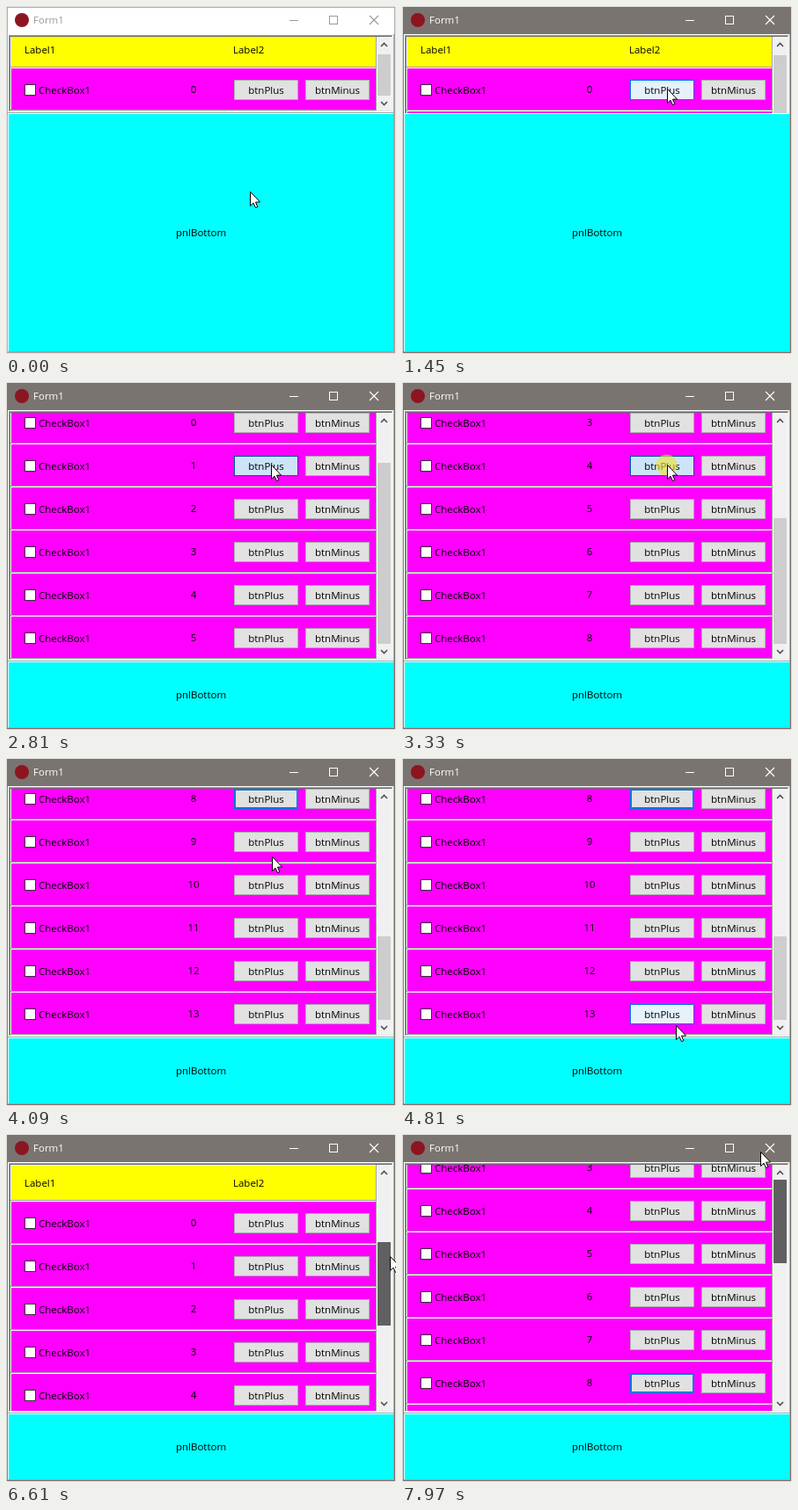
An HTML page with a canvas that plays this animation: 443 by 396 pixels, repeating every 8000 ms.

```html
<!DOCTYPE html>
<html lang="en">
<head>
<meta charset="utf-8">
<title>Form1</title>
<style>
html, body { margin: 0; width: 443px; height: 396px; overflow: hidden; background: #fff; }
canvas { display: block; }
</style>
</head>
<body>
<canvas id="stage" width="443" height="396"></canvas>
<script>
const g = document.getElementById('stage').getContext('2d');
const LOOP = 8000, ACTIVATE = 530;
const TOP = 35, HEAD = 41, ROW = 49, TRACK = 52;
const HOLD = 140, GLOW = 60, LAG = 80;

// Times at which the mouse button goes down on a btnPlus
const run = (start, count, gap) => Array.from({ length: count }, (_, i) => start + i * gap);
const clicks = [1310, ...run(1810, 4, 200), ...run(2810, 8, 150)];

// Mouse moves: start, end, x, y
const moves = [
  [80, 180, 265, 186], [740, 890, 319, 101], [1030, 1170, 301, 94],
  [4010, 4450, 306, 190], [4530, 4790, 311, 304], [4890, 5250, 425, 208],
  [5530, 5930, 425, 56], [6360, 6450, 425, 127], [6600, 6610, 436, 139],
  [6850, 7600, 427, 165], [7680, 7890, 395, 9], [7890, 7970, 407, 20]
];

// Scroll thumb drags; the content jumps to its new offset on release
const drags = [
  { from: 5530, to: 6010, scroll: 0 },
  { from: 6360, to: 6810, scroll: 210 },
  { from: 7680, to: LOOP, scroll: 0 }
];

const clamp = (v, lo, hi) => Math.max(lo, Math.min(hi, v));
const rowsAt = t => 1 + clicks.filter(c => t >= c + HOLD).length;
const viewOf = n => 84 + ROW * (Math.min(n, 5) - 1);

function mouseAt(t) {
  let x = 277, y = 211;
  for (const [from, to, endX, endY] of moves) {
    const k = clamp((t - from) / (to - from), 0, 1);
    x += (endX - x) * k;
    y += (endY - y) * k;
  }
  return [Math.round(x), Math.round(y)];
}

function rect(x, y, w, h, color) {
  g.fillStyle = color;
  g.fillRect(x, y, w, h);
}

function frame(x, y, w, h, color, line = 1) {
  g.strokeStyle = color;
  g.lineWidth = line;
  g.strokeRect(x + line / 2, y + line / 2, w - line, h - line);
}

function text(s, x, y, align = 'left', color = '#000') {
  g.font = '11.5px "Open Sans", "Noto Sans", sans-serif';
  g.textAlign = align;
  g.fillStyle = color;
  g.fillText(s, x, y);
}

function trace(points) {
  g.beginPath();
  for (const [x, y] of points) g.lineTo(x, y);
}

function line(points, color, width) {
  trace(points);
  g.strokeStyle = color;
  g.lineWidth = width;
  g.stroke();
}

function disc(x, y, r, color) {
  g.fillStyle = color;
  g.beginPath();
  g.arc(x, y, r, 0, 7);
  g.fill();
}

// Raised panel: light top and left edge, dark bottom and right edge
function panel(x, y, w, h, color) {
  rect(x, y, w, h, '#a0a0a0');
  rect(x, y, w - 1, h - 1, '#fff');
  rect(x + 1, y + 1, w - 2, h - 2, color);
}

function sunken(x, y, w, h) {
  rect(x, y, w, h, '#fff');
  rect(x, y, w - 1, h - 1, '#a0a0a0');
  rect(x + 1, y + 1, w - 2, h - 2, '#e3e3e3');
  rect(x + 1, y + 1, w - 3, h - 3, '#696969');
}

const looks = {
  normal: ['#e1e1e1', '#adadad', 1],
  focus: ['#e1e1e1', '#0078d7', 2],
  hover: ['#e5f1fb', '#0078d7', 1],
  pressed: ['#cce4f7', '#005499', 1]
};

function button(label, x, y, state) {
  const [fill, edge, width] = looks[state];
  rect(x, y, 73, 23, fill);
  frame(x, y, 73, 23, edge, width);
  text(label, x + 36.5, y + 16, 'center');
}

function drawWindow(active) {
  const bar = active ? '#7a7470' : '#fff', ink = active ? '#fff' : '#999';
  rect(0, 0, 443, 396, '#e8e8e8');
  rect(1, 1, 441, 394, active ? bar : '#a9a9a9');
  rect(2, 2, 439, 30, bar);
  disc(18, 16, 8, '#8c1520');
  text('Form1', 31, 20, 'left', ink);
  rect(322, 16, 10, 1, ink);
  frame(367, 11, 10, 10, ink);
  line([[413, 11], [423, 21]], ink, 1.1);
  line([[423, 11], [413, 21]], ink, 1.1);
}

function drawRow(i, y, mx, my, focused, pressed) {
  const over = x => mx >= x && mx < x + 73 && my >= y + 13 && my <= y + 38;
  panel(5, y, 416, ROW, '#f0f');
  rect(21, y + 19, 13, 13, '#fff');
  frame(21, y + 19, 13, 13, '#333');
  text('CheckBox1', 37, y + 30);
  text(i, 213, y + 29, 'center');
  const plus = focused && pressed ? 'pressed' : over(259) ? 'hover' : focused ? 'focus' : 'normal';
  button('btnPlus', 259, y + 14, plus);
  button('btnMinus', 340, y + 14, over(340) ? 'hover' : 'normal');
}

function drawScrollBar(view, total, scroll, drag, mx, my) {
  const track = view - 34, size = Math.round(track * view / total), end = TOP + view;
  const rest = s => TRACK + Math.round(track * s / total);
  let thumb = rest(scroll);
  if (drag) {
    const goal = rest(drag.scroll), grab = mouseAt(drag.from)[1];
    thumb = clamp(thumb + my - grab, Math.min(thumb, goal), Math.max(thumb, goal));
  }
  const over = mx >= 421 && mx < 438 && my >= thumb && my < thumb + size;
  rect(421, TOP, 17, view, '#fff');
  rect(422, TOP, 15, view, '#f0f0f0');
  rect(422, thumb, 15, size, drag ? '#606060' : over ? '#a6a6a6' : '#cdcdcd');
  line([[426, 46], [429.5, 42.5], [433, 46]], '#505050', 1.6);
  line([[426, end - 10], [429.5, end - 6.5], [433, end - 10]], '#505050', 1.6);
}

function drawTop(t, mx, my, drag) {
  const n = rowsAt(t), view = viewOf(n), total = HEAD + ROW * n;
  const done = drags.filter(d => t >= d.to).pop();
  const scroll = done ? done.scroll : total - view;
  const started = clicks.filter(c => t >= c).length;
  const focus = started ? Math.max(0, started - 5) : -1;
  const pressed = clicks.some(c => t >= c && t < c + HOLD);
  const y = TOP - scroll;

  panel(2, 32, 439, view + 6, '#f0f0f0');
  sunken(3, 33, 437, view + 4);
  g.save();
  g.beginPath();
  g.rect(5, TOP, 416, view);
  g.clip();
  panel(5, y, 416, HEAD, '#ff0');
  text('Label1', 21, y + 25);
  text('Label2', 258, y + 25);
  for (let i = 0; i < n; i++)
    drawRow(i, y + HEAD + ROW * i, drag ? -1 : mx, my, i === focus, pressed);
  g.restore();
  drawScrollBar(view, total, scroll, drag, mx, my);
}

// The lower panel follows the upper one a moment late
function drawBottom(t) {
  const y = TOP + viewOf(rowsAt(t - LAG)) + 3;
  panel(2, y, 439, 394 - y, '#0ff');
  text('pnlBottom', 221.5, Math.floor((y + 394) / 2) + 4, 'center');
}

function drawMouse(x, y) {
  const shape = [[0, 0], [0, 16], [3.5, 12.7], [6, 18], [8.4, 17.2], [6, 11.7], [11, 11.5]];
  trace(shape.map(([dx, dy]) => [x + dx + .5, y + dy + .5]));
  g.closePath();
  g.fillStyle = '#fff';
  g.fill();
  g.strokeStyle = '#000';
  g.lineWidth = 1;
  g.stroke();
}

function draw(t) {
  const [mx, my] = mouseAt(t);
  const drag = drags.find(d => t >= d.from && t < d.to);
  const glow = [ACTIVATE - GLOW, ...clicks].some(c => t >= c + GLOW && t < c + HOLD);
  drawWindow(t >= ACTIVATE);
  drawTop(t, mx, my, drag);
  drawBottom(t);
  if (glow) disc(mx - .5, my + .5, 12, 'rgba(240,225,50,.6)');
  drawMouse(mx, my);
}

function tick() {
  draw(performance.now() % LOOP);
  requestAnimationFrame(tick);
}
tick();
</script>
</body>
</html>
```
